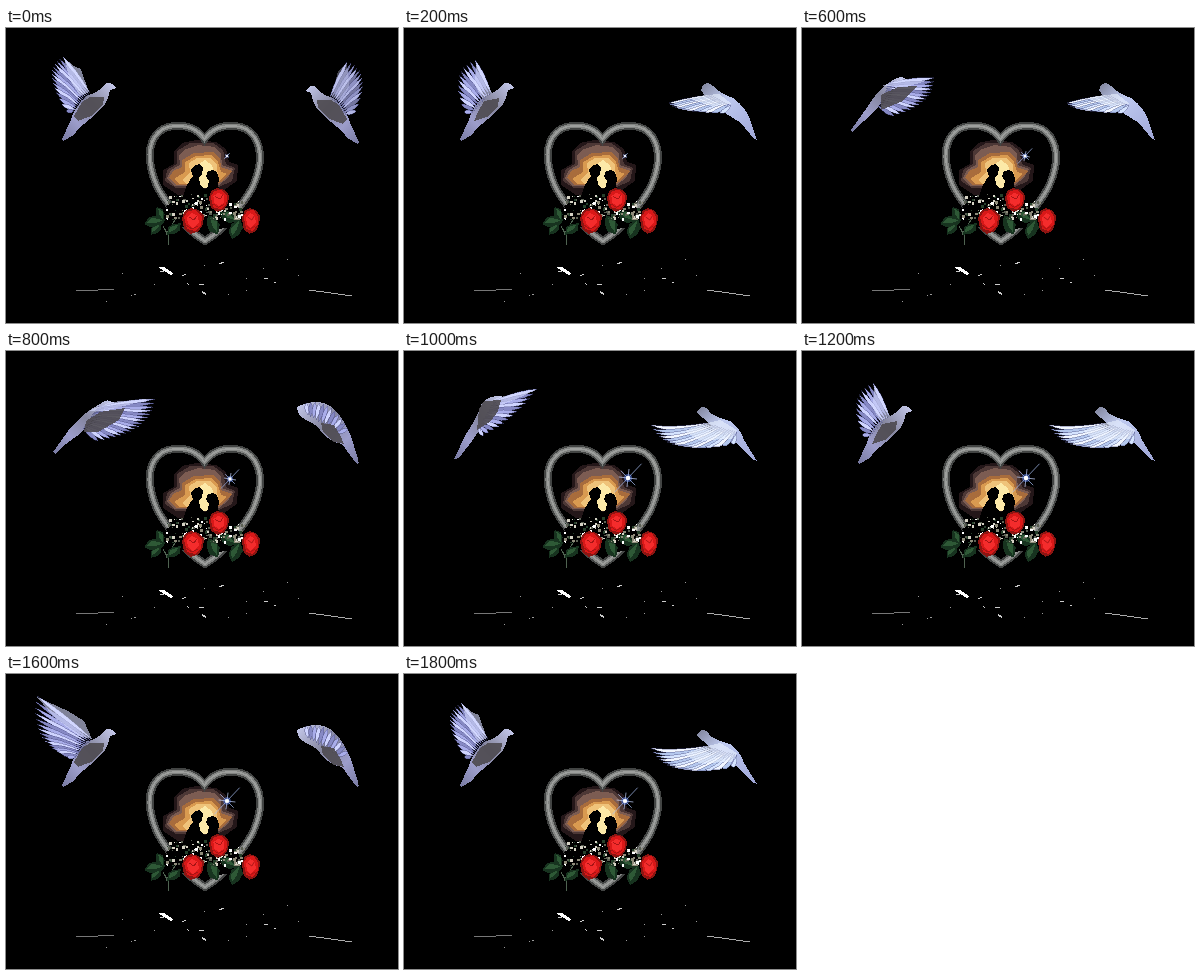
These frames come from a looping animation (392x295 px, 2 s). An HTML page:

```html
<!DOCTYPE html>
<html lang="en">
<head>
<meta charset="utf-8">
<title>Doves and heart</title>
<style>
html, body { margin: 0; width: 100%; height: 100%; overflow: hidden; background: #000; }
svg { display: block; width: 100%; height: 100%; shape-rendering: crispEdges; }
</style>
</head>
<body>
<svg viewBox="0 0 392 295">
  <defs>
    <linearGradient id="plume" x1="1" y1="0" x2="0" y2="1">
      <stop offset="0" stop-color="#c9cdf0"/><stop offset=".4" stop-color="#85869f"/><stop offset=".7" stop-color="#9c9dcb"/><stop offset="1" stop-color="#7779a0"/>
    </linearGradient>
    <linearGradient id="coat" x1="0" y1="0" x2="1" y2="1">
      <stop offset="0" stop-color="#7d8198"/><stop offset=".35" stop-color="#bfcaf0"/><stop offset="1" stop-color="#9ea5d6"/>
    </linearGradient>
    <path id="heart" d="M198.500 111C190 99 178 97 168 98C151 99 142 114 144 133C147 159 160 173 172 188C181 201 190 207 199 213C208 207 217 201 226 188C238 173 251 159 254 133C255 114 246 99 229 98C219 97 207 99 198.500 111Z"/>
    <g id="rose">
      <path fill="#8d1512" d="M-11-3L-8-10L-2-13L6-11L11-5L10 3L6 10L-2 13L-9 8Z"/>
      <path fill="#d81818" d="M-9-4L-5-10L3-11L9-4L8 4L2 10L-6 8Z"/>
      <path fill="#f42c2c" d="M-6-4L-1-8L5-5L6 2L0 7L-5 3Z"/>
      <path fill="none" stroke="#a51414" d="M-4-4L1-1L4-5M-7 4L-1 8L5 5"/>
    </g>
    <g id="leaf">
      <path fill="#17331f" d="M-11 0L-5-6L3-6L11 0L4 6L-4 5Z"/>
      <path fill="#2e5936" d="M-8-1L-2-5L9 0L0 1Z"/>
    </g>
  </defs>

  <g id="sunset">
    <path fill="#241719" d="M168 123L176 115L190 112L210 114L220 121L223 134L232 137L231 153L218 162L206 167H172L157 157L157 142L168 136Z"/>
    <path fill="#4d3836" d="M171 123L184 115L207 115L217 122L220 136L229 140L226 153L213 159L170 160L159 153L161 142L171 136Z"/>
    <path fill="#7c5c52" d="M173 127L180 121L192 117L209 119L215 126L216 137L227 141L222 150L213 157L168 158L161 150L165 142L174 137Z"/>
    <path fill="#a86c3c" d="M176 132L188 125L207 124L214 131L215 139L226 143L218 152L210 157L170 157L163 150L167 143L176 139Z"/>
    <path fill="#d99a50" d="M179 134L190 128L205 127L212 134L215 144L221 146L213 153L174 156L168 151L179 144Z"/>
    <path fill="#efc37a" d="M183 135L191 130L205 130L211 137L212 150L181 157L176 152L184 144Z"/>
    <path fill="#fce9a8" d="M192 137L199 132L206 137L208 144L204 160L192 161Z"/>
    <path d="M178 166L180 159L184 152L187 148L185 142L189 137L194 136L197 140L196 146L193 149L194 157L199 162L202 158L203 153L200 148L202 143L207 142L211 144L213 151L212 158L216 167L205 173H178Z"/>
  </g>

  <g fill="none">
    <use href="#heart" stroke="#424443" stroke-width="8"/>
    <use href="#heart" stroke="#828482" stroke-width="4.500"/>
    <use href="#heart" stroke="#9d9f9d" stroke-width="1.500"/>
  </g>

  <g id="bouquet">
    <path d="M160 178L178 168L200 172L230 176L239 190L225 199L200 203L170 198Z"/>
    <path fill="none" stroke="#4f6351" d="M162 217V207L157 198M160 207L170 190"/>
    <use href="#leaf" transform="translate(149 194) rotate(-12)"/>
    <use href="#leaf" transform="translate(154 186) rotate(65) scale(.7)"/>
    <use href="#leaf" transform="translate(150 201) rotate(-48) scale(.7)"/>
    <use href="#leaf" transform="translate(207 197) rotate(62)"/>
    <use href="#leaf" transform="translate(230 201) rotate(-68)"/>
    <use href="#leaf" transform="translate(222 189) rotate(25) scale(.9)"/>
    <use href="#leaf" transform="translate(168 201) rotate(-40) scale(.8)"/>
    <g id="sprigs"></g>
    <use href="#rose" transform="translate(213 172) scale(.92)"/>
    <use href="#rose" transform="translate(187 193)"/>
    <use href="#rose" transform="translate(245 193) scale(.82 1)"/>
  </g>

  <g id="floor" fill="none" stroke="#ccc">
    <path stroke="#777" d="M70 263L92 262L108 261"/>
    <path stroke="#aaa" d="M303 262L325 265L346 268"/>
    <path fill="#fff" stroke="none" d="M152 239L158 239L167 245L165 247L158 243Z"/>
    <path stroke-width="2" d="M196 264L200 266"/>
    <path d="M154 244L158 243M193 257L198 256M176 248L180 246M213 236L218 234M181 255L183 257M258 251L262 250M268 254L270 255"/>
    <path stroke="#999" d="M116 245h1M125 267h1M100 273h1M281 231h1M257 240h1M240 250h1M240 262h1M292 247h1M198 237h1M148 256h1M128 266h2M222 266h1"/>
  </g>

  <use id="star"/>
  <use id="left"/>
  <use id="right"/>
</svg>
<script>
const $ = id => document.getElementById(id);
const svg = document.querySelector('svg');
const defs = svg.querySelector('defs');

const flyBody = 'M110 60L104 62Q102 72 97 79Q86 90 72 101L68 107L57 113L56 111L64 94Q69 77 82 67Q93 64 97 58Q101 53 106 56Z';
const wideBody = 'M110 60L104 62Q102 72 96 79Q86 90 74 96L69 107L61 118L58 117L65 94Q69 77 82 67Q93 64 97 58Q101 53 106 56Z';
const foldBody = 'M119 54Q119 62 110 67Q98 72 94 80Q84 90 74 91L63 106L58 112Q56 108 61 97Q65 78 76 63Q86 49 98 49Q110 49 119 54Z';
const belly = 'M68 88L76 74L84 69L98 69L97 77L85 88L72 93Z';

// root: wing base segment; tips: quadratic through the feather ends; sag: downward bow
const poses = {
  up: { body: flyBody, shade: belly, root: [84, 65, 68, 83], tips: [57, 29, 33, 40, 60, 83], n: 14,
    cover: 'M58 30L68 38L75 41L79 53L83 64L74 68L64 52Z' },
  raised: { body: flyBody, shade: belly, root: [85, 66, 70, 83], tips: [68, 31, 42, 38, 59, 80], n: 13, dim: true,
    cover: 'M68 32L77 40L80 52L84 65L74 71L66 56Z' },
  high: { body: flyBody, shade: 'M74 84L80 73L95 70L94 79L83 89L70 93Z', root: [87, 65, 69, 84], tips: [71, 32, 44, 42, 60, 84], n: 12,
    cover: 'M72 36L80 47L88 65L78 70L71 57Z' },
  wide: { body: wideBody, root: [85, 64, 72, 80], tips: [23, 25, 30, 74, 66, 82], n: 15, dim: true,
    cover: 'M25 26L60 40L73 45L86 65L73 61L45 43Z', shade: 'M72 91L76 80L88 75L97 71L93 80L82 88Z' },
  lifted: { body: flyBody, root: [86, 65, 70, 83], tips: [31, 22, 22, 66, 61, 83], n: 15,
    cover: 'M31 23L62 37L78 47L86 65L73 62L48 43Z', shade: belly },
  fold: { body: foldBody, shade: 'M75 84L82 72L95 70L93 79L82 89L72 91Z', root: [108, 62, 78, 80], tips: [110, 50, 84, 45, 68, 76], n: 12 },
  down: { body: 'M104 50L97 54Q82 70 73 83L50 104L49 102L66 78Q80 55 98 49Z', root: [87, 55, 76, 78], tips: [132, 50, 133, 76, 92, 88], n: 14,
    cover: 'M80 58L99 51L124 53L104 59Z', shade: 'M79 67L96 59L115 58L101 73L79 82Z' },
  reach: { body: 'M109 52L102 56Q85 68 74 83Q61 91 49 103L47 101L65 76Q80 60 94 53Q101 47 106 51Z', root: [92, 56, 77, 77], tips: [149, 48, 145, 82, 92, 90], n: 17,
    cover: 'M82 60L105 51L142 48L122 54L98 60Z', shade: 'M80 70L94 61L119 57L113 69L92 81L78 81Z' },
  rise: { body: 'M99 47L92 54Q87 70 74 81L68 90L55 107L50 108L62 83Q72 69 78 52Q86 44 98 45Z', root: [90, 50, 74, 77], tips: [133, 38, 112, 68, 79, 85], n: 13,
    cover: 'M90 48L108 43L132 39L112 48L95 55Z', shade: 'M75 58L80 50L97 49L94 60L87 70L73 79Z' },
  level: { body: 'M297 62L299 57Q304 53 309 58Q315 65 329 70Q343 80 347 94L353 112L350 111L337 95Q321 85 307 76Z', root: [306, 67, 327, 77], tips: [265, 75, 270, 84, 316, 85], n: 12, sag: 1, bright: true,
    cover: 'M285 70L302 67L315 66L328 76L308 78Z' },
  spread: { body: 'M291 59L294 56Q299 54 303 60Q313 66 326 69Q337 77 340 91L354 108L350 107L334 93Q313 88 303 75Z', root: [296, 70, 332, 78], tips: [245, 70, 249, 110, 320, 94], n: 19,
    cover: 'M253 71L286 68L318 68L332 79L310 79L283 75Z', shade: 'M293 83L320 80L332 88L313 92Z' },
  glide: { body: 'M292 61L296 57Q302 54 306 62Q312 66 326 70Q337 78 340 89L353 110L350 109L332 92Q314 88 305 72Z', root: [303, 72, 333, 81], tips: [247, 74, 260, 106, 327, 92], n: 15, sag: 4, bright: true,
    cover: 'M281 80L296 74L316 69L333 79L328 88L295 89Z' }
};

function feathers({ root: [ax, ay, bx, by], tips: [x0, y0, x1, y1, x2, y2], n, sag = 0, bright, dim }) {
  const tones = bright ? ['#f2f7ff', '#b4c8ee', '#d5e4ff'] : dim ? ['#b0b4e2', '#74769f', '#8f92c4'] : ['#cfd4ff', '#8689c4', '#a9adea'];
  let out = '';
  for (let i = 0; i < n; i++) {
    const t = i / (n - 1), u = 1 - t;
    const rx = ax * u + bx * t, ry = ay * u + by * t;
    const tx = u * u * x0 + 2 * u * t * x1 + t * t * x2;
    const ty = u * u * y0 + 2 * u * t * y1 + t * t * y2;
    const len = Math.hypot(tx - rx, ty - ry) || 1;
    const w = 4, nx = (ry - ty) / len * w, ny = (tx - rx) / len * w;
    const mx = rx * .4 + tx * .6, my = ry * .4 + ty * .6 + sag * 2;
    out += `<path fill="${tones[i % 3]}" stroke="#4a4c80" stroke-width=".4" d="M${rx} ${ry}Q${mx + nx} ${my + ny} ${tx} ${ty}Q${mx - nx} ${my - ny} ${rx} ${ry}Z"/>`;
  }
  return out;
}

function dove(p) {
  const body = `<path fill="url(#${p.bright ? 'coat' : 'plume'})" d="${p.body}"/>`;
  const cover = p.cover ? `<path fill="${p.bright ? '#eaf2ff' : '#d6daff'}" fill-opacity="${p.dim ? .3 : .6}" d="${p.cover}"/>` : '';
  const shade = p.shade ? `<path fill="#4e4b50" fill-opacity=".9" d="${p.shade}"/>` : '';
  return body + feathers(p) + cover + shade;
}

let seed = 7;
const rand = () => (seed = seed * 16807 % 2147483647) / 2147483647;
const sprigTones = ['#fff', '#d5d2c4', '#8f8c7a', '#5c6154', '#26402b'];
let dots = '';
for (let i = 0; i < 150; i++) {
  const x = 160 + rand() * 78, lift = x < 205 ? 7 : 0;
  const y = 173 - lift + rand() * (18 + lift), size = 1 + rand() * 2;
  dots += `<rect x="${x}" y="${y}" width="${size}" height="${size}" fill="${sprigTones[i % 5]}"/>`;
}
$('sprigs').innerHTML = dots;

const stars = [[221, 128, 3], [221, 129, 7], [223, 128, 8], [224, 128, 10], [224, 127, 15], [221, 127, 14]];
const ray = (x, y, dx, dy) => `M${x - dx} ${y - dy}L${x + dx} ${y + dy}`;
function sparkle([x, y, r]) {
  const s = r * .6;
  return `<g shape-rendering="auto">
    <circle cx="${x}" cy="${y}" r="${1 + r * .2}" fill="#4d70d8" opacity=".6"/>
    <path stroke="#a9c0f5" stroke-width=".7" d="${ray(x, y, r * .9, -r * .95)}${ray(x, y, s * .8, s * .8)}"/>
    <path stroke="#c5d5ff" stroke-width=".7" d="${ray(x, y, s, 1)}${ray(x, y, -1, s)}"/>
    <circle cx="${x}" cy="${y}" r="${.7 + r * .1}" fill="#fff"/></g>`;
}

const group = (id, inner) => `<g id="${id}">${inner}</g>`;
defs.insertAdjacentHTML('beforeend',
  Object.keys(poses).map(k => group(k, dove(poses[k]))).join('') +
  stars.map((s, i) => group('star' + i, sparkle(s))).join(''));

const leftSteps = ['up', 'high', 'fold', 'down', 'reach', 'rise', 'high', 'wide', 'lifted', 'up'];
const rightSteps = ['raised', 'level', 'spread', 'level', 'fold', 'glide', 'glide', 'fold', 'fold', 'glide'];
const starSteps = [0, 0, 1, 2, 3, 4, 4, 4, 5, 5];
const mirrored = { raised: 'translate(409 3) scale(-1 1)', fold: 'translate(410 2) scale(-1 1)' };

let shown = -1;
function draw() {
  const step = Math.floor(performance.now() % 2000 / 200);
  if (step !== shown) {
    shown = step;
    const pose = rightSteps[step];
    $('left').setAttribute('href', '#' + leftSteps[step]);
    $('right').setAttribute('href', '#' + pose);
    $('right').setAttribute('transform', mirrored[pose] || '');
    $('star').setAttribute('href', '#star' + starSteps[step]);
  }
  requestAnimationFrame(draw);
}
draw();
</script>
</body>
</html>
```
